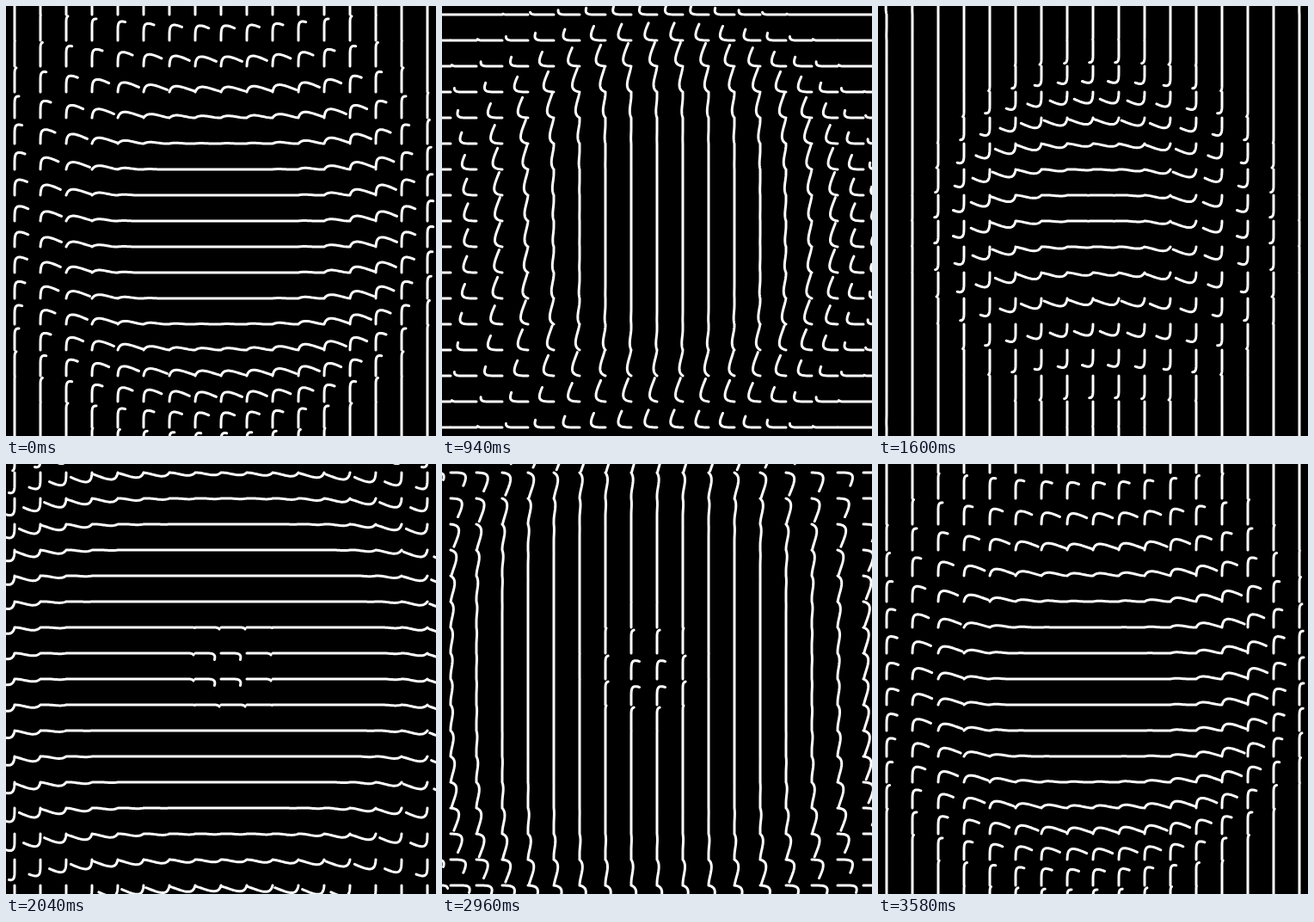
Recreate the animation shown at these times as an HTML page with a canvas. Size 500 by 500 pixels, loop 3.6 s.

```html
<!DOCTYPE html>
<html>
<head>
<meta charset="utf-8">
<style>
  html, body { margin: 0; width: 100%; height: 100%; overflow: hidden; background: #000; }
  canvas { display: block; }
</style>
</head>
<body>
<canvas id="stage" width="500" height="500"></canvas>
<script>
const ctx = document.getElementById("stage").getContext("2d");
const SIZE = 500, CELL = 30, LOOP = 3600;
const PHASE = LOOP / 4;   // one quarter turn
const SWING = 500;        // time a single point needs for its turn
const LAG = 230;          // how far the pivot trails behind the tip
const SPEED = 0.35;       // ripple speed, px per ms
const STEPS = 24;

const clamp = x => Math.min(1, Math.max(0, x));
const ease = x => x * x * x * (x * (6 * x - 15) + 10);

// A rod stands on the lower left corner of its cell and bends from up to right.
// Each following phase is the same move, turned a quarter counterclockwise.
function drawRod(cx, cy, time) {
  const delay = Math.hypot(cx - SIZE / 2, cy - SIZE / 2) / SPEED;
  const local = (time + PHASE - delay + 2 * LOOP) % LOOP;
  const turn = Math.floor(local / PHASE);
  const elapsed = local % PHASE;

  for (let i = 0; i <= STEPS; i++) {
    const s = i / STEPS;
    const lag = LAG * (1 - s ** 1.5);
    const q = ease(clamp((elapsed - lag) / SWING));
    let x = -CELL / 2 + CELL * s * q;
    let y = CELL / 2 - CELL * s * (1 - q);
    for (let k = 0; k < turn; k++) [x, y] = [y, -x];
    if (i) ctx.lineTo(cx + x, cy + y);
    else ctx.moveTo(cx + x, cy + y);
  }
}

function draw(time) {
  ctx.fillStyle = "#000";
  ctx.fillRect(0, 0, SIZE, SIZE);
  ctx.strokeStyle = "#fff";
  ctx.lineWidth = 3;
  ctx.lineCap = ctx.lineJoin = "round";
  ctx.beginPath();
  for (let cy = -5; cy <= 505; cy += CELL)
    for (let cx = -5; cx <= 505; cx += CELL) drawRod(cx, cy, time);
  ctx.stroke();
}

const start = performance.now();
function tick() {
  draw((performance.now() - start) % LOOP);
  requestAnimationFrame(tick);
}
tick();
</script>
</body>
</html>
```
